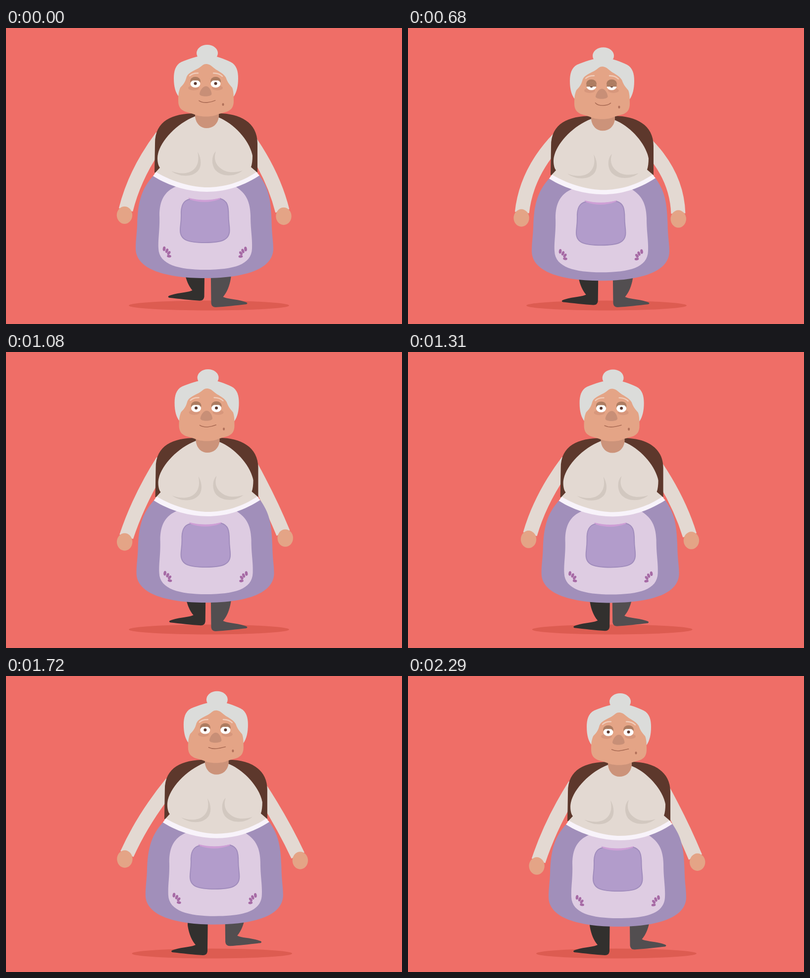
An HTML page that plays this animation: 800x600 px, repeating every 2.39 s.

```html
<!DOCTYPE html>
<html lang="en">
<head>
<meta charset="utf-8">
<title>Dancing granny</title>
<style>
  html, body { margin: 0; width: 100%; height: 100%; overflow: hidden; background: #ef6e67; }
  svg { display: block; width: 100%; height: 100%; }
</style>
</head>
<body>
<svg viewBox="0 0 800 600">
  <defs>
    <path id="leg" d="M367 470H408L407 558Q406 566 398 566C380 565 355 562 336 560Q332 558 336 556C355 549 374 550 383 545C375 536 369 521 367 505Z"/>
    <g id="sprig" fill="#a66aa5">
      <ellipse rx="2.8" ry="4.7" transform="translate(319.5 447.5) rotate(8)"/>
      <ellipse rx="2.7" ry="4.6" transform="translate(325 451.5) rotate(22)"/>
      <ellipse rx="2.6" ry="4.4" transform="translate(329 456) rotate(40)"/>
      <ellipse rx="2.7" ry="4.4" transform="translate(329.5 462.5) rotate(98)"/>
    </g>
    <clipPath id="eyeClip"><ellipse rx="10.4" ry="8.2"/></clipPath>
    <g id="eye">
      <ellipse cy="-5.5" rx="10.5" ry="8.5" fill="#ad7c61"/>
      <ellipse rx="10" ry="7.8" fill="#fff"/>
      <circle cy="-.5" r="3" fill="#5f3a30"/>
      <g clip-path="url(#eyeClip)"><rect class="lid" x="-11" y="-27" width="22" height="19" fill="#ad7c61"/></g>
    </g>
  </defs>

  <rect width="800" height="600" fill="#ef6e67"/>
  <ellipse id="shadow" cx="410" cy="562.5" rx="162" ry="10" fill="#dd5c51"/>
  <use id="legL" href="#leg" fill="#32302e"/>
  <use id="legR" href="#leg" fill="#524e50"/>

  <g id="body">
    <g fill="none" stroke="#e3d9d2" stroke-width="29">
      <path id="armL"/>
      <path id="armR"/>
    </g>
    <g fill="#e4a486">
      <ellipse id="handL" rx="15.7" ry="17.7"/>
      <ellipse id="handR" rx="15.7" ry="17.7"/>
    </g>

    <path fill="#5d382c" d="M383 173C336 173 301 188 301 234L300 293L400 310L508 293V234C508 191 472 173 429 173Z"/>
    <path fill="#a18fba" d="M297 300C275 325 266 350 265 400C264 420 262 430 262 447C262 490 325 507 401 507C480 507 540 490 540 447C540 430 537 420 536.500 390C535 345 530 325 512 299Z"/>
    <path fill="#decce2" d="M344 321C320 331 310 350 310 380C311 410 307 425 308 447C309 480 350 490 402 490C460 490 496 480 497 447C498 425 494 410 494 380C493 345 480 332 463 321Z"/>
    <path fill="#e3d9d2" d="M382 179C341 195 306 236 306 264C306 275 309 281 311 283L300 295C340 320 380 328 406 328C440 328 475 316 509 294L495 282C497 276 498 268 498 259C493 230 462 194 429 181Z"/>
    <path fill="#f8f3fa" d="M303 292C340 314 380 323 406 323C440 323 475 313 506 292L512 299C475 323 440 332 406 332C370 332 330 321 297 300Z"/>
    <g fill="#d2c8c0">
      <path d="M387 251C394 262 396 278 389 288C378 303 352 303 334 290C352 297 370 296 380 286C389 277 390 264 387 251Z"/>
      <path d="M424 250C415 258 414 278 424 289C437 302 462 302 478 289C460 294 445 294 433 284C421 274 420 262 424 250Z"/>
    </g>
    <path fill="#b29ccb" stroke="#a08cbc" stroke-width="2" d="M371 347C357 350 353 362 354 380C354 395 352 400 352 410C352 431 370 435 402 435C435 435 451.500 430 451.500 410C451.500 398 449.500 395 449.500 380C449.500 360 447 350 433 346Q402 354 371 347Z"/>
    <path fill="#ce9fd6" d="M368 344Q402 353 434 344L432 347Q402 358 372 348Z"/>
    <use href="#sprig"/>
    <use href="#sprig" transform="matrix(-1 0 0 1 803.5 0.5)"/>

    <path fill="#cc937a" d="M382 165V180C384 195 394 203 405 203C418 203 428 195 430 180V165Z"/>
    <g fill="#dbdcda">
      <ellipse cx="406.5" cy="51" rx="21.5" ry="17"/>
      <path d="M406 54C387 57 370 62 354 69C342 75 339 88 339 102C339 120 343 132 349 139H460C466 130 469 118 469 102C469 88 466 75 454 69C440 62 425 57 406 54Z"/>
    </g>
    <path fill="#e4a486" d="M404 73C398 73 395 78 388 82C372 90 366 93 364 102C361 113 355 117 352 121C348 130 348 140 348 148C348 172 370 170 380 175C392 181 416 181 428 175C440 170 460 172 460 148C460 140 460 128 457 121C449 112 447 108 444 100C438 90 425 86 420 81C413 75 410 73 404 73Z"/>
    <g fill="#d7977c">
      <ellipse cx="379" cy="121.5" rx="11" ry="5"/>
      <ellipse cx="427" cy="121.5" rx="11" ry="5"/>
    </g>
    <path fill="none" stroke="#f0cdbb" stroke-width="2.4" stroke-linecap="round" d="M371 97Q377 91 388 91.5M419 91.5Q430 91 437 98"/>
    <use href="#eye" x="382.5" y="113"/>
    <use href="#eye" x="423.5" y="113"/>
    <path fill="#c88f77" d="M404 118C396 118 391 130 391 134C392 140 414 140 415.5 134C415.5 129 411 118 404 118Z"/>
    <path id="mouth" fill="none" stroke="#ab6c55" stroke-width="1.6" stroke-linecap="round"/>
    <ellipse cx="438.5" cy="155" rx="2" ry="2.8" fill="#b0705a"/>
  </g>
</svg>

<script>
const $ = id => document.getElementById(id);
const clamp = v => Math.min(1, Math.max(0, v));
const mix = (a, b, k) => a + (b - a) * k;

const LOOP = 2390, STEP = 57.25, STEPS = 40, CYCLE = 1210;

// A smooth curve through [time, value] points that never overshoots them.
function track(...pts) {
  const rate = i => (pts[i + 1][1] - pts[i][1]) / (pts[i + 1][0] - pts[i][0]);
  const last = pts.length - 1;
  const slopes = pts.map((_, i) => {
    if (i === 0 || i === last) return rate(Math.min(i, last - 1));
    const a = rate(i - 1), b = rate(i);
    return a * b <= 0 ? 0 : 2 * a * b / (a + b);
  });
  return t => {
    let i = 0;
    while (i < last - 1 && t >= pts[i + 1][0]) i++;
    const [t0, a] = pts[i], [t1, b] = pts[i + 1], d = t1 - t0;
    const u = clamp((t - t0) / d), v = 1 - u;
    return mix(a, b, u * u * (3 - 2 * u)) + d * u * v * (v * slopes[i] - u * slopes[i + 1]);
  };
}

// Sideways drift over the whole loop.
const sway = track([0, 0], [270, -10.5], [530, -14], [680, -12], [1080, 1.5], [1490, 12.2], [1950, 25], [2290, 22]);
const shade = track([0, 0], [680, -9], [1080, 0], [2290, 11]);

// Repeated in every dance cycle.
const bounce = track([0, 0], [270, 3], [530, -3.5], [760, 8.5], [1080, 1], [CYCLE, 0]);
const spread = track([0, .11], [270, .54], [470, 1], [710, 0], [1080, .17], [CYCLE, .11]);
const bend = track([0, 18], [470, 11], [700, 30], [1080, 11], [CYCLE, 18]);
const tilt = track([0, -1], [700, -1], [1080, 4], [CYCLE, -1]);

// dir is the outward direction of the bend.
function drawArm(side, sx, sy, x, y, bow, dir) {
  const dx = x - sx, dy = y - sy, len = Math.hypot(dx, dy);
  const cx = sx + dx / 2 + dir * bow * dy / len;
  const cy = sy + dy / 2 - dir * bow * dx / len;
  const reach = 11 / Math.hypot(x - cx, y - cy);
  $("arm" + side).setAttribute("d",
    `M${sx} ${sy}Q${cx} ${cy} ${mix(x, cx, reach)} ${mix(y, cy, reach)}`);
  $("hand" + side).setAttribute("transform", `translate(${x} ${y})`);
}

function draw(t) {
  const beat = t % CYCLE;
  const x = sway(t), y = bounce(beat);
  $("body").setAttribute("transform", `translate(${x} ${y})`);
  $("shadow").setAttribute("cx", 410 + shade(t));

  const open = spread(beat), bow = bend(beat), lean = tilt(beat);
  drawArm("L", 315, 220, 242 - 23 * open, 381 - 6 * open + lean, bow, -1);
  drawArm("R", 493, 230, 554 + 21 * Math.sqrt(open), 381 - 5 * open - lean, 1.5 * bow - 12, 1);

  // The free foot follows the body; weight moves to the other foot midway.
  const k = clamp((t - 1080) / 270), w = k * k * (3 - 2 * k);
  const lift = 13.3 - 1.67 * y;
  $("legL").setAttribute("transform",
    `translate(${(1.4 * x - 6.5) * (1 - w)} ${-lift * (1 - w)})`);
  $("legR").setAttribute("transform",
    `matrix(-1 0 0 1 ${821.5 + (2.45 * x - 20) * w} ${-lift * w})`);

  const smile = clamp(.45 - x / 20);
  $("mouth").setAttribute("d",
    `M${mix(389.5, 390.5, smile)} ${mix(148, 146.5, smile)}` +
    `C${mix(400, 396, smile)} ${mix(153, 153.5, smile)} ${mix(411, 414, smile)} ${mix(150, 153.5, smile)} ` +
    `${mix(423.5, 421.5, smile)} ${mix(146.8, 147, smile)}`);

  const blink = Math.max(.08, 1 - Math.abs(t - 740) / 120);
  document.querySelector(".lid").setAttribute("y", -27 + 17 * blink);
}

// Motion advances in even steps; the last pose is held until the loop restarts.
function tick() {
  const step = Math.min(STEPS, Math.floor((performance.now() % LOOP + 16) / STEP));
  draw(Math.max(0, step * STEP - 6));
  requestAnimationFrame(tick);
}
tick();
</script>
</body>
</html>
```
